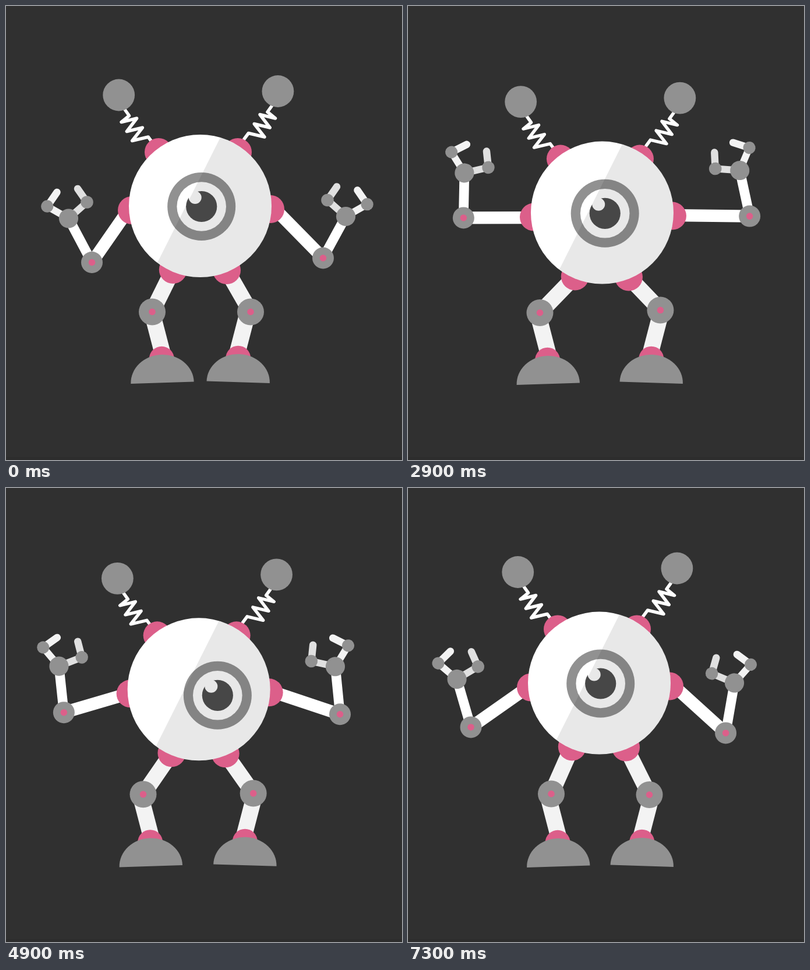
Animation of 680 by 780 pixels, one loop 7.4 s. Source, as an HTML page with a canvas:

```html
<!DOCTYPE html>
<html lang="en">
<head>
<meta charset="utf-8">
<title>Dancing robot</title>
<style>
html, body { margin: 0; width: 100%; height: 100%; overflow: hidden; background: #303030; }
canvas { display: block; }
</style>
</head>
<body>
<canvas id="stage" width="680" height="780"></canvas>
<script>
const ctx = document.getElementById('stage').getContext('2d');
const BG = '#303030', GREY = '#919191', PINK = '#dc5f8a', WHITE = '#fff', PALE = '#f3f3f3', DIM = '#e0e0e0';
const LOOP = 7400, STEP = 100, TURN = 2600, SINK = 2800;

const ease = u => (1 - Math.cos(Math.PI * u)) / 2;
const clamp = u => Math.min(1, Math.max(0, u));
const mix = (a, b, k) => a + (b - a) * k;

// Each part has three keys: standing at the start, deepest crouch, standing at the end.
const BODY = { x: [333.5, 333.5, 328.5], y: [343.5, 355.3, 335] };
const LEFT = {
  side: -1,
  elbowX: [147.5, 95.3, 108], elbowY: [440.5, 363.5, 411],
  wristX: [107.5, 97, 84], wristY: [365, 286.5, 328.5],
  turn: [0, 28.8, 10.8],
  kneeX: [251, 226.3, 246], kneeY: [525.5, 527, 525.5],
  footX: [268.5, 240.6, 258.3], footY: [647.3, 649.2, 650.3]
};
const RIGHT = {
  side: 1,
  elbowX: [544.5, 586.7, 545.5], elbowY: [433, 360.5, 421],
  wristX: [583.5, 569.8, 560.5], wristY: [361.5, 282, 335],
  turn: [0, -37.8, -18.9],
  kneeX: [420, 433.6, 414.5], kneeY: [525.5, 522.5, 527],
  footX: [398.7, 417.9, 401.7], footY: [646.2, 647.2, 649.2]
};

// How far the robot stands up from its crouch: 1 at both ends of the loop, 0 at TURN.
function lift(t) {
  return t < TURN ? ease((TURN - t) / SINK) / ease(TURN / SINK) : ease((t - TURN) / (LOOP - TURN));
}

function poseAt(keys, t) {
  const k = lift(t), pose = { side: keys.side };
  for (const name in keys) {
    if (name === 'side') continue;
    const [start, low, end] = keys[name];
    // elbows swing on an arc, so they move sideways least when level
    pose[name] = mix(low, t < TURN ? start : end, name === 'elbowX' ? k ** 1.5 : k);
  }
  return pose;
}

// The eye rides with the body, then glances right and left at a fixed height and recentres.
function eyeAt(t, bodyY) {
  const u = clamp((t - TURN) / (LOOP - STEP - TURN));
  const held = BODY.y[1] - bodyY;
  return {
    x: 2.2 + 33 * Math.sin(2 * Math.PI * u ** 1.6),
    y: 1 + (u > 0 ? held * (1 - ease(clamp((u - 0.66) / 0.34))) : 0)
  };
}

function disc(x, y, r, color) {
  ctx.fillStyle = color;
  ctx.beginPath();
  ctx.arc(x, y, r, 0, 7);
  ctx.fill();
}

function line(points, width, color, cap = 'butt') {
  ctx.strokeStyle = color;
  ctx.lineWidth = width;
  ctx.lineCap = cap;
  ctx.lineJoin = 'round';
  ctx.beginPath();
  points.forEach(([x, y]) => ctx.lineTo(x, y));
  ctx.stroke();
}

function joint(x, y, r) {
  disc(x, y, r, GREY);
  disc(x, y, 5.8, PINK);
}

function leg(p, hipX, hipY) {
  const ankleX = p.footX + p.side * 0.6 - 0.6, ankleY = p.footY - 41;
  line([[hipX, hipY], [p.kneeX, p.kneeY]], 27, PALE);
  line([[ankleX - p.side * 4, ankleY], [ankleX + p.side * 17, ankleY - 81]], 27.8, PALE);
  joint(p.kneeX, p.kneeY, 23);
  disc(ankleX, ankleY, 21.5, PINK);
  ctx.fillStyle = GREY;
  ctx.beginPath();
  ctx.ellipse(p.footX, p.footY, 54.2, 48.3, p.side * 0.031, Math.PI, 2 * Math.PI);
  ctx.fill();
  disc(hipX, hipY, 24, PINK);
}

function hand(p) {
  ctx.save();
  ctx.translate(p.wristX, p.wristY);
  ctx.rotate(p.turn * Math.PI / 180);
  ctx.scale(p.side, 1);
  const inner = [-31.5, -28], outer = [36.7, -20.8];
  line([[0, 0], inner], 12, DIM);
  line([inner, [-15.5, -51]], 12.5, DIM, 'round');
  line([[0, 0], outer], 12, PALE);
  line([outer, [20, -45]], 12.5, PALE, 'round');
  disc(...inner, 10.8, GREY);
  disc(...outer, 10.6, GREY);
  disc(0, 0, 16.6, GREY);
  ctx.restore();
}

function arm(p, x, y) {
  line([[x + p.side * 7, y - p.side], [p.elbowX, p.elbowY]], 21.3, WHITE);
  line([[p.elbowX, p.elbowY], [p.wristX, p.wristY]], 16.7, WHITE);
  joint(p.elbowX, p.elbowY, 18.5);
  disc(x, y, 24, PINK);
  hand(p);
}

function antenna(side, dx, dy, baseX) {
  const spring = [[122.7, -171.5], [115.5, -161.5]];
  for (let i = 0; i < 3; i++) {
    spring.push([129 - 9.3 * i, -150.5 + 16 * i], [102.5 - 9.8 * i, -157 + 16 * i]);
  }
  spring.push([75.5, -115]);
  ctx.save();
  ctx.translate(dx, dy);
  ctx.scale(side, 1);
  line(spring, 5.5, WHITE, 'round');
  disc(133.4, -197, 27.4, GREY);
  ctx.restore();
  disc(baseX, -92.5, 24, PINK);
}

function torso(eye) {
  const R = 122.5;
  disc(0, 0, R, WHITE);
  disc(eye.x, eye.y, 58.5, GREY);
  disc(eye.x, eye.y, 42.3, WHITE);
  disc(eye.x, eye.y, 26.6, '#4e4e4e');
  disc(eye.x - 11, eye.y - 15.5, 11, WHITE);
  // shaded side, a circle segment
  ctx.fillStyle = 'rgba(0,0,0,0.09)';
  ctx.beginPath();
  ctx.arc(0, 0, R, Math.atan2(-117.5, 34.5), Math.atan2(97.5, -73.5));
  ctx.fill();
}

function draw(t) {
  const { x, y } = poseAt(BODY, t), left = poseAt(LEFT, t), right = poseAt(RIGHT, t);
  ctx.fillStyle = BG;
  ctx.fillRect(0, 0, 680, 780);
  ctx.fillStyle = '#2d2d2d';
  ctx.fillRect(0, 775, 680, 5);

  leg(left, x - 46.7, y + 109.5);
  leg(right, x + 45.5, y + 110.5);
  arm(left, x - 117.5, y + 7.5);
  arm(right, x + 120.5, y + 5.5);

  ctx.save();
  ctx.translate(x, y);
  antenna(-1, -6.4, 6.5, -71.5);
  antenna(1, 0, 0, 64.5);
  torso(eyeAt(t, y));
  ctx.restore();
}

const start = performance.now();
function tick() {
  const t = (performance.now() - start) % LOOP;
  draw(Math.floor(t / STEP) * STEP);
  requestAnimationFrame(tick);
}
tick();
</script>
</body>
</html>
```
